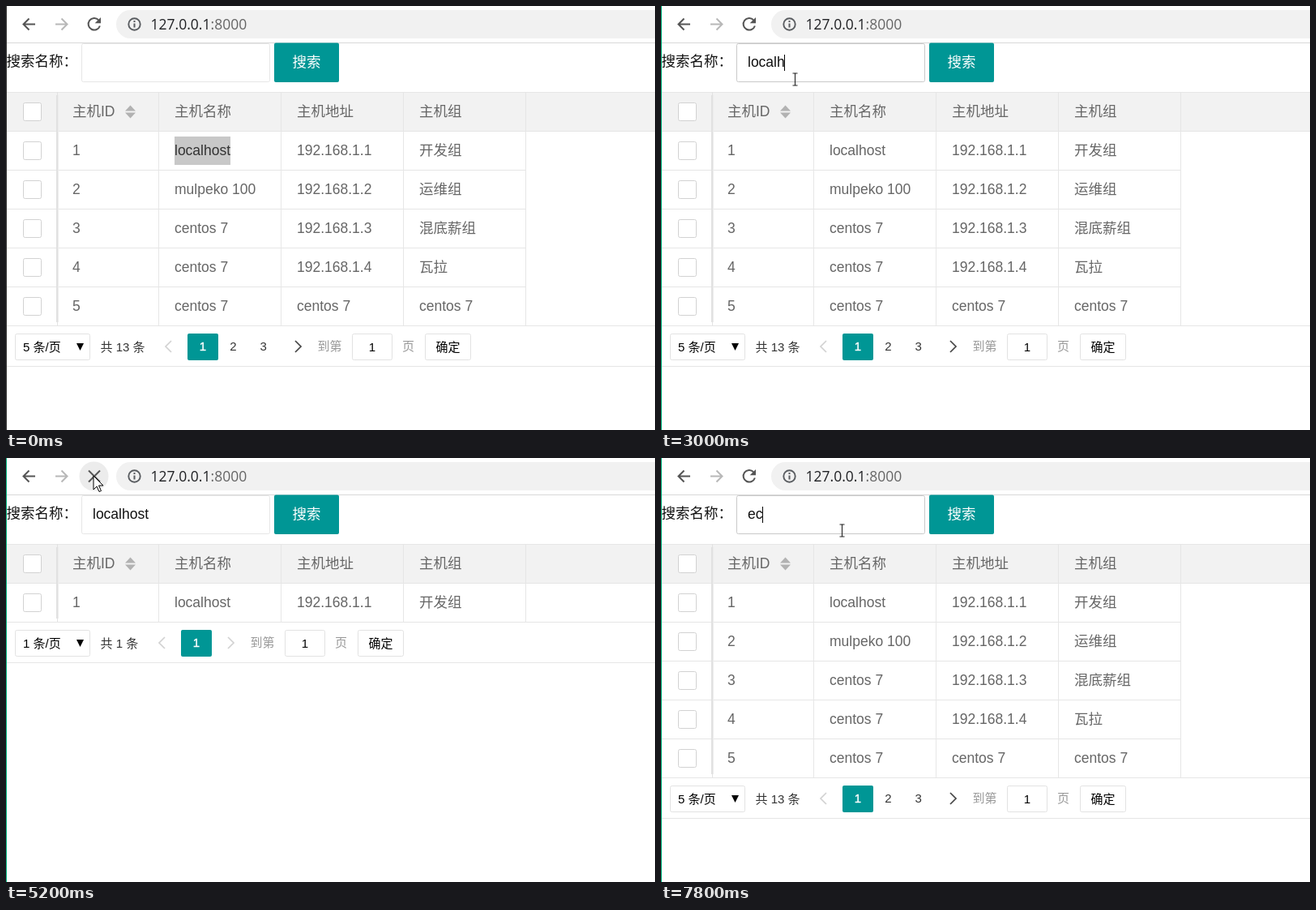
An HTML page that plays this animation: 801x523 px, repeating every 8000 ms.

```html
<!DOCTYPE html>
<html lang="zh-CN">
<head>
<meta charset="utf-8">
<title>主机列表搜索</title>
<style>
  html, body { margin: 0; width: 100%; height: 100%; overflow: hidden; background: #fff; }
  svg { display: block; width: 801px; height: 523px; }
  text { font: 17.5px "Liberation Sans", "Noto Sans CJK SC", "Noto Sans CJK", "Noto Sans CJK JP", sans-serif; white-space: pre; }
  .small { font-size: 15px; }
  .url { font-family: "Open Sans", "Noto Sans", sans-serif; }
</style>
</head>
<body>
<svg id="stage" viewBox="0 0 801 523" xmlns="http://www.w3.org/2000/svg"></svg>
<script>
const LOOP = 8000, TEAL = '#009695', LINE = '#e6e6e6';
const stage = document.getElementById('stage');

const rect = (x, y, w, h, fill, more = '') =>
  `<rect x="${x}" y="${y}" width="${w}" height="${h}" fill="${fill}" ${more}/>`;
const box = (x, y, w, h, stroke, more = '') =>
  rect(x + .5, y + .5, w - 1, h - 1, '#fff', `stroke="${stroke}" rx="2" ${more}`);
const text = (x, y, s, fill = '#666', more = '') =>
  `<text x="${x}" y="${y}" fill="${fill}" ${more}>${s}</text>`;
const small = (x, y, s, fill, more = '') => text(x, y, s, fill, `class="small" ${more}`);
const path = (d, stroke, width = 2, more = '') =>
  `<path d="${d}" fill="none" stroke="${stroke}" stroke-width="${width}" ${more}/>`;
const group = (id, content) => `<g id="${id}">${content}</g>`;

const hosts = [
  ['1', 'localhost', '192.168.1.1', '开发组'],
  ['2', 'mulpeko 100', '192.168.1.2', '运维组'],
  ['3', 'centos 7', '192.168.1.3', '混底薪组'],
  ['4', 'centos 7', '192.168.1.4', '瓦拉'],
  ['5', 'centos 7', 'centos 7', 'centos 7']
];
const colX = [82, 208, 359, 510];

function rowText(cells, top) {
  return box(21, top + 13, 23, 23, '#d2d2d2') +
    cells.map((c, i) => text(colX[i], top + 30, c)).join('');
}

function table(id, rows) {
  const bottom = 154 + rows.length * 48;
  let s = rect(1, 106, 800, 49, '#f2f2f2') + rect(1, 106, 800, 1, LINE) + rect(1, 154, 800, 1, LINE);
  s += rect(1, 0, 640, 47, '#f2f2f2', `id="${id}Hover"`);
  rows.forEach((_, i) => { s += rect(1, 202 + i * 48, 641, 1, LINE); });
  for (const x of [188, 339, 490, 641]) s += rect(x, 106, 1, bottom - 106, LINE);
  s += rect(62, 110, 1, bottom - 114, '#e0e0e0') + rect(63, 106, 1, bottom - 106, '#e2e2e2') +
    rect(64, 110, 1, bottom - 114, '#ededed');
  s += rowText(['主机ID', '主机名称', '主机地址', '主机组'], 106);
  s += '<path d="M147 129.5l6.5-7 6.5 7zM147 131.5l6.5 7 6.5-7z" fill="#b2b2b2"/>';
  rows.forEach((r, i) => { s += rowText(r, 154 + i * 48); });
  return s + rect(1, bottom, 800, 1, LINE) + rect(1, bottom + 50, 800, 1, LINE);
}

// dx shifts the page buttons, ex the jump controls
function pager(y, size, total, pages, dx, ex) {
  const base = y + 22, mid = y + 16;
  let s = box(11, y, 93, 33, '#e2e2e2') + small(21, base, size + ' 条/页', '#000') +
    `<path d="M87 ${mid - 4}h9l-4.5 9z" fill="#000"/>` + small(116.5, base, `共 ${total} 条`, '#333');
  s += path(`M${204 + dx} ${mid - 7}l-7 7 7 7`, '#d2d2d2', 1.7) + rect(224 + dx, y, 38, 33, TEAL, 'rx="2"');
  for (let i = 0; i < pages; i++)
    s += small(243 + dx + i * 37.3, base - 1, i + 1, i ? '#333' : '#fff',
      'text-anchor="middle"' + (i ? '' : ' stroke="#fff" stroke-width=".4"'));
  const next = pages > 1 ? 357 : 274;
  s += path(`M${next} ${mid - 7}l7 7-7 7`, pages > 1 ? '#444' : '#d2d2d2', 1.7);
  return s + small(384.5 + ex, base - 1, '到第', '#999') + box(427 + ex, y, 50, 33, '#e2e2e2') +
    small(452 + ex, base, '1', '#000', 'text-anchor="middle"') + small(489 + ex, base - 1, '页', '#999') +
    box(517 + ex, y, 57, 33, '#e2e2e2') + small(530.5 + ex, base, '确定', '#000');
}

const browser =
  rect(0, 45, 801, 1, '#d8d8d8') + rect(136, 5, 700, 35, '#f1f1f1', 'rx="17.5"') +
  path('M36 22.5H22M28.5 15.5l-7 7 7 7', '#555') + path('M61 22.5h14M68.5 15.5l7 7-7 7', '#b8b8b8') +
  '<circle id="halo" cx="108.5" cy="22.5" r="18" fill="#ececec"/>' +
  group('reload', path('M114.2 17.2a7.3 7.3 0 1 0 1.7 7.3', '#555') + '<path d="M117 14v7.3h-7.3z" fill="#555"/>') +
  group('stop', path('M102 15.5l14 14M116 15.5l-14 14', '#555')) +
  '<circle cx="158.5" cy="22.5" r="7.2" fill="none" stroke="#5a5d61" stroke-width="1.9"/>' +
  rect(157.5, 21.5, 2, 5, '#5a5d61') + rect(157.5, 18, 2, 2, '#5a5d61') +
  text(178.5, 28.5, '127.0.0.1<tspan fill="#666">:8000</tspan>', '#202124', 'class="url"');

const search =
  text(.5, 74, '搜索名称：', '#111') + box(93, 46, 233, 48, LINE, 'id="field"') +
  text(107, 75, '', '#111', 'id="query"') + rect(107, 60, 1, 20, '#000', 'id="caret"') +
  rect(331, 45.5, 80, 48.5, TEAL, 'rx="2"') +
  text(353.5, 75, '搜索', '#fff', 'id="label" stroke="#fff" stroke-width="0"');

const cursors =
  group('beam', path('M-3 -7.5h2.5l.5.5.5-.5h2.5M0 -7v14M-3 7.5h2.5l.5-.5.5.5h2.5', '#222', 1.1)) +
  group('arrow', '<path d="M0 0v17l4-4 3 6.5 2.5-1-3-6.5h5.5z" fill="#fff" stroke="#000"/>') +
  group('hand',
    '<path d="M-3 14h14a7 8 0 0 1-14 0z" fill="#000"/>' +
    '<path d="M-1 1q1.500-2 3 0v6l2-1 1.500 1 2-.5 1 1 2 .5v4l-1.500 5h-9l-5-6.500q.5-2 2.500-.5l1.500 1z" fill="#f7556d" stroke="#c93a55" stroke-width=".6"/>' +
    path('M2 7v4M5 7.500v3.500M8 8v3', '#fbb', .7));

stage.innerHTML = rect(0, 0, 801, 523, '#fff') + browser +
  group('full', table('full', hosts) + pager(404, 5, 13, 3, 0, 0)) +
  group('single', table('single', hosts.slice(0, 1)) + pager(212, 1, 1, 1, -8, -83)) +
  group('picked', rect(208, 161, 69, 35, '#c8c8c8') + text(208, 184, 'localhost', '#333')) +
  search + rect(0, 0, 1, 523, '#333', 'id="edge"') + group('pointer', cursors);

const el = {};
stage.querySelectorAll('[id]').forEach(n => { el[n.id] = n; });
const show = (id, on) => el[id].setAttribute('display', on ? 'inline' : 'none');
const within = (t, a, b) => t >= a && t < b;

const route = [
  [200, 635, 330], [400, 430, 215], [700, 185, 78], [1000, 158, 82], [1200, 161, 86], [1400, 165, 90],
  [3600, 165, 90], [3800, 245, 84], [4000, 358, 79], [4100, 363, 78], [4500, 361, 77], [4700, 360, 77],
  [4800, 325, 66], [5000, 160, 30], [5100, 108, 22], [5300, 108, 22], [5500, 271, 58],
  [5700, 240, 76], [5900, 223, 89]
];
const keys = [[2000, 'l'], [2400, 'lo'], [2600, 'loc'], [2700, 'loca'], [2800, 'local'], [3000, 'localh'],
  [3200, 'localho'], [3300, 'localhos'], [3500, 'localhost'], [5300, ''], [6800, 'e'], [6900, 'ec'],
  [7000, 'ecn'], [7100, 'ecnt'], [7500, 'ecn'], [7600, 'ec'], [7700, 'e'], [7800, 'ec']];
const caretOn = [[700, 1200], [1600, 4000], [5900, 6500], [6800, LOOP]];

function position(t) {
  const i = route.findIndex(p => p[0] > t);
  if (i < 0) return route[route.length - 1].slice(1);
  if (!i) return route[0].slice(1);
  const a = route[i - 1], b = route[i], k = (t - a[0]) / (b[0] - a[0]);
  return [1, 2].map(j => Math.round(a[j] + (b[j] - a[j]) * k));
}

function render(time) {
  const t = Math.floor(time / 100) * 100;
  const [x, y] = position(t);
  const full = t < 4400 || t >= 5700, single = within(t, 4400, 5300);
  show('full', full);
  show('single', single);
  show('picked', t < 700);
  const loading = within(t, 5200, 5800);
  show('reload', !loading);
  show('stop', loading);
  show('halo', Math.hypot(x - 108, y - 22) < 18);
  el.edge.setAttribute('fill', t < 200 ? '#333' : '#00b37e');

  const row = Math.floor((y - 155) / 48);
  const hover = t >= 200 && x < 641 && row >= 0 && row < 5;
  for (const id of ['fullHover', 'singleHover']) {
    show(id, hover && id === 'fullHover');
    el[id].setAttribute('y', 155 + row * 48);
  }

  const typed = keys.filter(k => k[0] <= t).pop();
  el.query.textContent = typed ? typed[1] : '';
  const width = el.query.textContent ? el.query.getComputedTextLength() : 0;
  el.caret.setAttribute('x', Math.floor(107 + width));
  show('caret', caretOn.some(c => within(t, c[0], c[1])));
  el.field.setAttribute('stroke', within(t, 700, 4300) || t >= 5700 ? '#c9c9c9' : LINE);

  const onField = y > 45 && y < 95 && x > 92 && x < 326;
  const onButton = y > 45 && y < 95 && x > 330 && x < 411;
  el.label.setAttribute('stroke-width', onButton ? .5 : 0);
  show('pointer', t >= 200);
  show('beam', onField);
  show('hand', onButton);
  show('arrow', !onField && !onButton);
  const half = onField ? .5 : 0;
  el.pointer.setAttribute('transform', `translate(${x + half} ${y + half})`);
}

const start = performance.now();
function tick() {
  render((performance.now() - start) % LOOP);
  requestAnimationFrame(tick);
}
tick();
</script>
</body>
</html>
```
